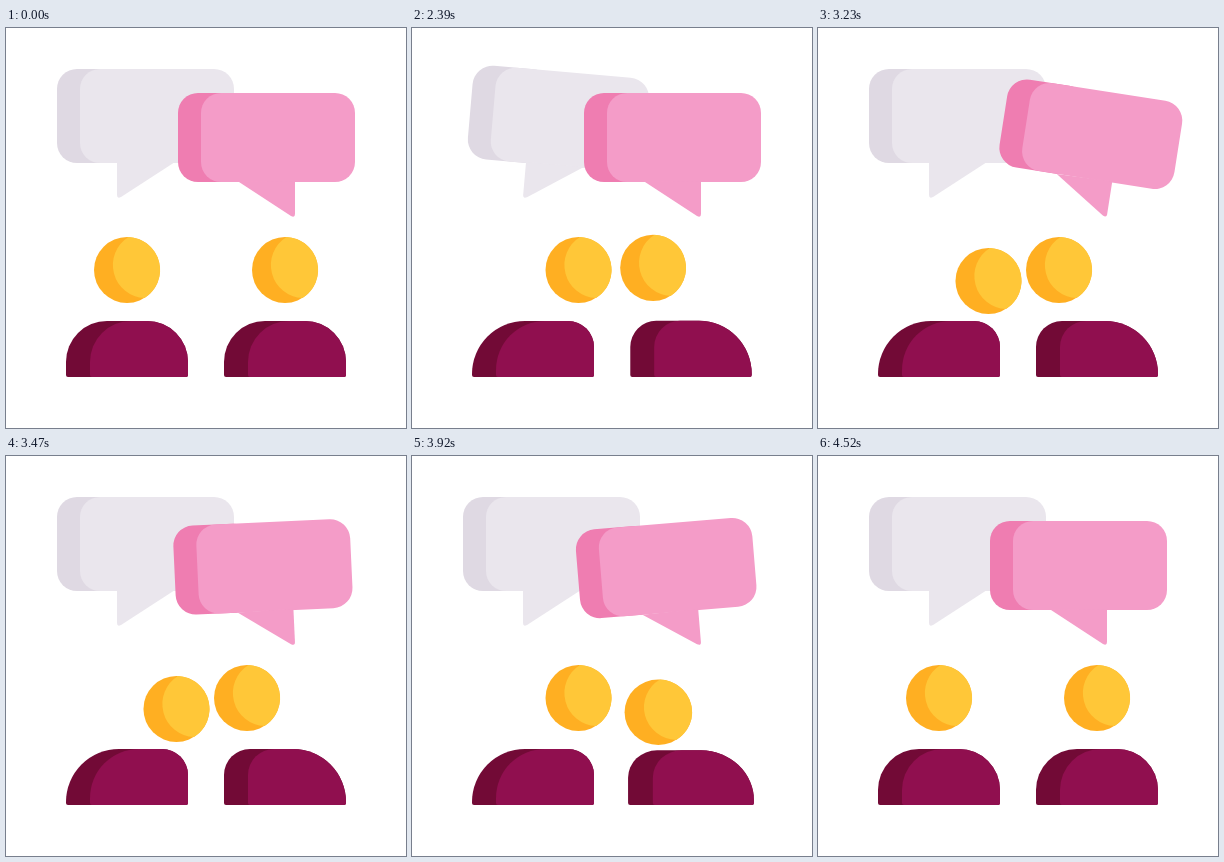
An HTML page for the animation above (4550 ms loop, 400x400 px).

```html
<!DOCTYPE html>
<html>
<head>
<meta charset="utf-8">
<title>Conversation</title>
<style>
html, body { margin: 0; width: 100%; height: 100%; overflow: hidden; background: #fff; }
svg { display: block; width: 100%; height: 100%; }
</style>
</head>
<body>
<svg viewBox="0 0 400 400">
  <defs>
    <g id="head">
      <circle r="33" fill="#ffaf22"/>
      <path d="M1.5-33A33 33 0 0 1 17.5 28A33 33 0 0 1 1.5-33Z" fill="#ffc738"/>
    </g>
  </defs>
  <g id="grey">
    <rect x="51" y="41" width="80" height="94" rx="20" fill="#dfd9e3"/>
    <rect x="74" y="41" width="154" height="94" rx="20" fill="#eae6ed"/>
    <path d="M111 134V167Q111 171 115 169L169 134Z" fill="#eae6ed"/>
  </g>
  <g id="pink">
    <rect x="172" y="65" width="80" height="89" rx="20" fill="#ef7db1"/>
    <rect x="195" y="65" width="154" height="89" rx="20" fill="#f49cc8"/>
    <path d="M289 153V186Q289 190 285 188L233 154Z" fill="#f49cc8"/>
  </g>
  <g class="person"><g><path fill="#720a36"/><path fill="#900f4f"/></g><use href="#head"/></g>
  <g class="person"><g><path fill="#720a36"/><path fill="#900f4f"/></g><use href="#head"/></g>
</svg>
<script>
const LOOP = 4550, START = 2030, STEP = 30, HALF_SWING = 216;

const people = [
  { x: 121, dir: 1, reach: 45.5, nod: 11, come: [2005, 360], leave: [4030, 460] },
  { x: 279, dir: -1, reach: 38, nod: 0, come: [2100, 350], leave: [3820, 500] }
];

const mix = (a, b, u) => a + (b - a) * u;
const clamp = u => Math.max(0, Math.min(1, u));
const smooth = u => (u = clamp(u), u * u * (3 - 2 * u));

// Straight swings through evenly spaced peaks, from rest to rest
function swing(t, start, peaks) {
  const u = Math.max(0, (t - start) / HALF_SWING), i = Math.floor(u);
  return mix(peaks[i - 1] || 0, peaks[i] || 0, u - i);
}

// A dip followed by a small rebound
function bounce(u) {
  const v = smooth(u);
  return 1.6 * Math.sin(2 * Math.PI * v) * Math.exp(-2 * v);
}

// Torso outline, bottom centre at the origin
const corner = (rx, x, y) => `A${rx} ${Math.min(rx, 53)} 0 0 1 ${x} ${y}`;
const side = r => Math.min(-3, r - 56);
const torso = (left, rl, rr) =>
  `M${left + 2} 0Q${left} 0 ${left} -2V${side(rl)}${corner(rl, left + rl, -56)}` +
  `H${61 - rr}${corner(rr, 61, side(rr))}V-2Q61 0 59 0Z`;

const grey = document.getElementById('grey');
const pink = document.getElementById('pink');
const nodes = [...document.querySelectorAll('.person')];

function drawPerson(p, node, t) {
  const [come, leave] = [p.come, p.leave].map(([start, length]) => (t - start) / length);
  const lean = smooth(come / .85) - smooth(leave / .85);
  const wave = bounce(come) + bounce(leave);
  const drop = p.nod * smooth((t - 2570) / 250) * smooth((3720 - t) / 250);
  const squash = .04 * wave;

  const [body, head] = node.children;
  const inner = mix(41, 26, lean);
  [[-61, 53], [-37, 49]].forEach(([left, wide], i) => {
    const outer = mix(41, wide, lean);
    const d = p.dir > 0 ? torso(left, outer, inner) : torso(left, inner, mix(41, 53, lean));
    body.children[i].setAttribute('d', d);
  });
  body.setAttribute('transform',
    `translate(${p.x} 349) scale(${1 + squash} ${1 - squash * .75})`);

  const x = p.x + p.dir * (p.reach * lean + drop * .36);
  const y = 242 + 18 * wave + drop;
  head.setAttribute('transform',
    `translate(${x} ${y}) scale(${1 + squash * .7} ${1 - squash * .3})`);
}

function draw(now) {
  let t = now % LOOP;
  t = t < START ? 0 : START + Math.floor((t - START) / STEP) * STEP;
  const greyTurn = swing(t, 2014, [-22, 14.4, -9, 5]);
  const pinkTurn = swing(t, 3110, [16, -12, 14, -11, 2.5]);
  grey.setAttribute('transform', `rotate(${greyTurn} 113 169)`);
  pink.setAttribute('transform', `rotate(${pinkTurn} 288 187)`);
  people.forEach((p, i) => drawPerson(p, nodes[i], t));
}

const origin = performance.now();
function tick() {
  draw(performance.now() - origin);
  requestAnimationFrame(tick);
}
tick();
</script>
</body>
</html>
```
